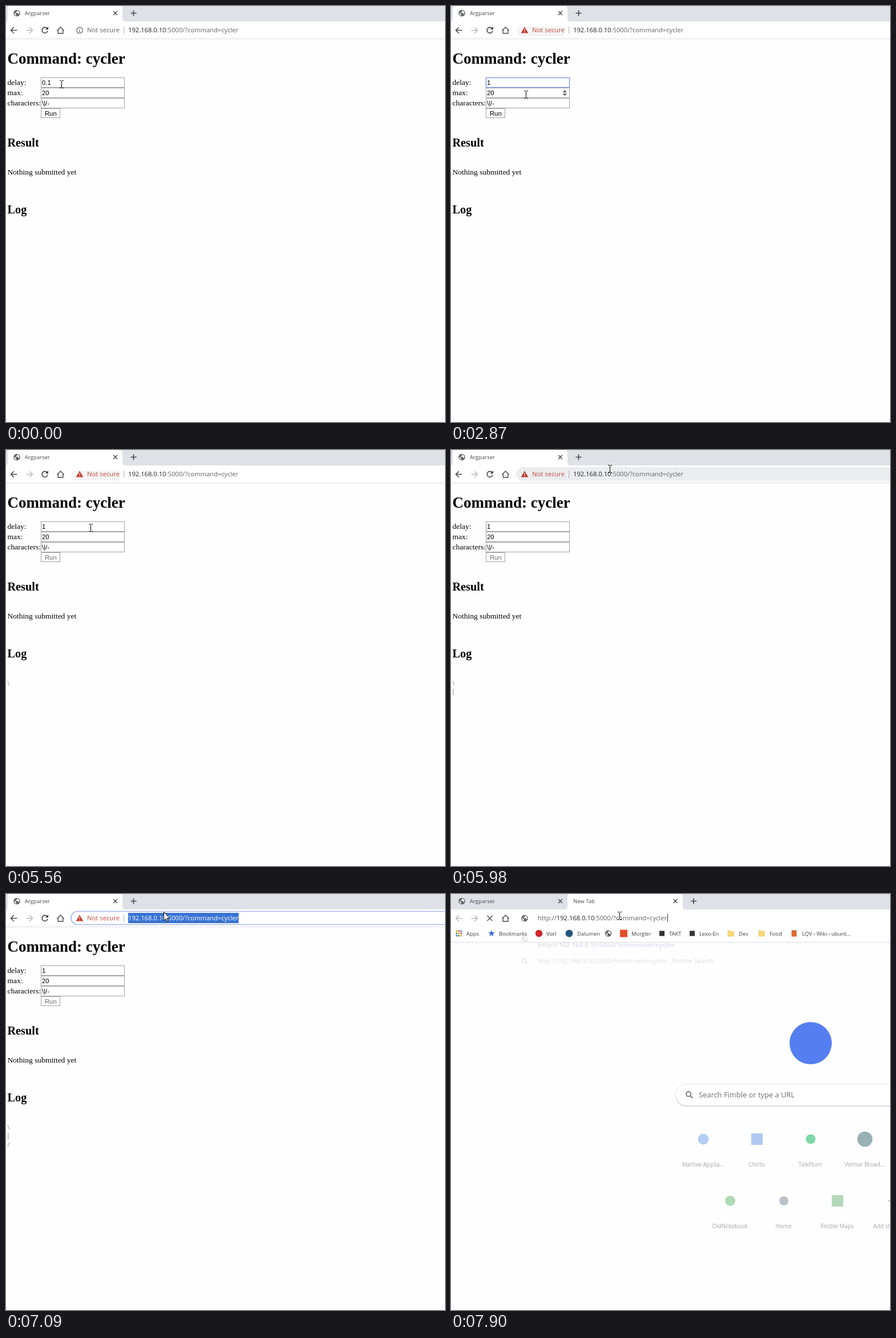
Recreate the animation shown at these times as an HTML page. Size 769 by 728 pixels, loop 8000 ms.

```html
<!DOCTYPE html>
<html lang="en">
<head>
<meta charset="utf-8">
<title>Argparser</title>
<style>
html, body { margin: 0; width: 100%; height: 100%; overflow: hidden; background: #fefefe; }
svg { display: block; width: 769px; height: 728px; }
text { white-space: pre; }
.ui { font-family: "Open Sans", "Noto Sans", sans-serif; }
.page { font-family: "Liberation Serif", "Times New Roman", serif; }
.field { font-family: "Liberation Sans", Arial, sans-serif; }
</style>
</head>
<body>
<svg id="stage" viewBox="0 0 769 728"></svg>
<script>
const LOOP = 8000, DARK = '#202124', GREY = '#5f6368', RED = '#c0392b';
const stage = document.getElementById('stage');

const text = (kind, x, y, s, size, color = '#000', more = '') =>
  `<text class="${kind}" x="${x}" y="${y}" font-size="${size}" fill="${color}" ${more}>${s}</text>`;
const rect = (x, y, w, h, fill, more = '') =>
  `<rect x="${x}" y="${y}" width="${w}" height="${h}" fill="${fill}" ${more}/>`;
const disc = (x, y, r, fill, more = '') =>
  `<circle cx="${x}" cy="${y}" r="${r}" fill="${fill}" ${more}/>`;
const line = (d, color, width = 1.5) =>
  `<path d="${d}" fill="none" stroke="${color}" stroke-width="${width}"/>`;
const shape = (d, fill, more = '') => `<path d="${d}" fill="${fill}" ${more}/>`;

// Mouse moves: start, end, number of steps, end point x, y
const moves = [
  [580, 1270, 6, 198, 133],
  [1580, 1580, 1, 12, 142],
  [2000, 2340, 3, 131, 155],
  [3000, 3440, 4, 81, 187],
  [4280, 4430, 2, 83, 187],
  [5290, 5980, 6, 278, 33],
  [6780, 6780, 1, 276, 31],
  [7750, 7750, 1, 295, 38]
];
const caretFlips = [150, 700, 1130, 1700, 2000, 2870, 3440, 3970, 4430, 4860];

function mouseAt(t) {
  let x = 97, y = 137;
  for (const [from, to, steps, tx, ty] of moves) {
    if (t < from) break;
    const step = t >= to ? steps : 1 + Math.floor((t - from) / (to - from) * (steps - 1) + 1e-6);
    x += (tx - x) * step / steps;
    y += (ty - y) * step / steps;
  }
  return { x: Math.round(x), y: Math.round(y) };
}

// Icons
const globe = (x, y, color = GREY) => `<g transform="translate(${x} ${y})">` + disc(0, 0, 5.8, color) +
  shape('M-4.5-1 L-1.5 1.5 L-1 4.6 Q-4 4-4.5-1Z M0-4.8 Q4-4 4.6 0 L3 2 L1.5-.5 L-1.8-.6 L-1.5-2 L.8-2.6Z', '#fff') + '</g>';
const cross = (x, y, r = 3.4, color = '#45484c') =>
  line(`M${x - r} ${y - r} l${2 * r} ${2 * r} m0 ${-2 * r} l${-2 * r} ${2 * r}`, color, 1.4);
const plus = (x, y) => line(`M${x - 5} ${y} h10 M${x} ${y - 5} v10`, '#45484c', 1.6);
const arrowIcon = (x, dir, color) =>
  line(`M${x - 5.5 * dir} 42.5 h${11 * dir} M${x - .2 * dir} 37.2 L${x - 5.5 * dir} 42.5 L${x - .2 * dir} 47.8`, color);
const lens = (x, y, r, color, width) =>
  disc(x - r / 3, y - r / 3, r, 'none', `stroke="${color}" stroke-width="${width}"`) +
  line(`M${x + r * .4} ${y + r * .4} l${r} ${r}`, color, width);
const home = line('M89.5 43 L95.5 37 L101.5 43 M91.2 42 V48 H99.8 V42', '#45484c', 1.4);
const reload = line('M72 39.2 A5 5 0 1 0 73 43.5', '#45484c', 1.6) + shape('M74 36 V41.3 H68.7Z', '#45484c');
const info = disc(129, 42.5, 5.2, 'none', `stroke="${GREY}" stroke-width="1.3"`) + line('M129 41.8 v3.6 M129 39.2 v1.4', GREY, 1.3);
const warning = shape('M129 36.5 L135.3 47.5 H122.7Z', RED) + line('M129 40 v3.6 M129 44.8 v1.4', '#fff', 1.2);
const folder = x => shape(`M${x - 5} 64 h4 l1.3 1.5 h5.2 v8.5 h-10.5Z`, '#f6d978', 'stroke="#e5c25c" stroke-width=".6"');

const tab = (a, b) => shape(`M${a - 4} 27 Q${a} 27 ${a} 22 V5 Q${a} 0 ${a + 5} -1 H${b - 5} ` +
  `Q${b} 0 ${b} 5 V22 Q${b} 27 ${b + 4} 27Z`, '#fff');

function address(x, prefix, selected) {
  const [strong, weak] = selected ? ['#fff', '#fff'] : [DARK, GREY];
  return text('ui', x, 46, `<tspan fill="${weak}">${prefix}</tspan>192.168.0.10` +
    `<tspan fill="${weak}">:5000/?command=cycler</tspan>`, 11.2, strong);
}

function tabStrip(newTab) {
  return rect(0, 0, 769, 27, '#dee1e6') + (newTab ? tab(204, 406) : tab(3, 204)) +
    rect(0, 27, 769, 30, '#fff') + globe(19, 12.5) + cross(191.5, 12.5) +
    text('ui', 33, 16.3, 'Argparser', 9.55, '#45484c') + arrowIcon(41, -1, '#b8babd') + home;
}

function formPage(t, mouse) {
  const focused = t >= 150 && t < 4860, edited = t >= 2000, sent = t >= 4860;
  const urlFocus = t >= 6660, urlHover = t >= 5840 && !urlFocus;
  let out = tabStrip(false) + plus(223.5, 12.5);

  if (urlHover) out += rect(114, 30, 700, 24, '#ebedef', 'rx="12"');
  else if (urlFocus) out += rect(114, 30.5, 700, 23, '#fff', 'rx="11.5" stroke="#a6b7ec" stroke-width="1.7"') +
    rect(214, 33, 193.5, 18, '#3873d3');
  else if (edited) out += shape('M199 36 H122 Q114 37 114 44 Q115 53 123 53 H199Z', '#f5f4f4');
  out += arrowIcon(14, 1, '#45484c') + reload + (edited ? warning : info) +
    text('ui', 142, 46, 'Not secure', 11.3, edited ? '#c24a3f' : GREY) +
    rect(206, 36, 1, 13, '#b5b7ba') + address(214, '', urlFocus) + rect(0, 57, 769, 1, '#dcdee1');

  out += text('page', 2.5, 101, 'Command: cycler', 27, '#000', 'font-weight="bold"');
  ['delay:', 'max:', 'characters:'].forEach((label, i) => {
    const y = 125.5 + 18 * i;
    out += text('page', 2.5, 138 + 18 * i, label, 13.5) + rect(61.5, y, 146, 17, '#fff', 'stroke="#a3a3a3"');
  });
  if (focused) out += rect(61.5, 125.5, 146, 17, '#fff', 'stroke="#8196dc" stroke-width="1.4"');
  const selecting = t >= 1700 && t < 2000;
  if (selecting) out += rect(63, 128, 16, 13, '#3873d3');
  [edited ? '1' : '0.1', '20', '\\|/-'].forEach((value, i) => {
    out += text('field', 63, 138 + 18 * i, value, 11.25, selecting && !i ? '#fff' : '#000');
  });
  if (caretFlips.filter(f => f <= t).length % 2) out += rect(edited ? 69 : 79, 128, 1, 13, '#000');

  const inForm = mouse.x > 61 && mouse.x < 208;
  if (inForm && mouse.y > 143 && mouse.y < 161)
    out += rect(195, 146, 8, 12, '#f3f3f3') + shape('M196 151 L199.3 147.2 L202.6 151Z M196 153.2 L199.3 157 L202.6 153.2Z', '#505050');

  const onRun = mouse.x > 61 && mouse.x < 95 && mouse.y > 179 && mouse.y < 196;
  out += rect(61.5, 179.5, 33, 16, '#fdfdfd', `stroke="${onRun && !sent ? '#666' : '#a3a3a3'}"`) +
    text('field', 68, 191.5, 'Run', 11.25, sent ? '#6c6f6c' : '#000');

  out += text('page', 2.5, 246, 'Result', 20.25, '#000', 'font-weight="bold"') +
    text('page', 2.5, 295, 'Nothing submitted yet', 13.5) +
    text('page', 2.5, 363, 'Log', 20.25, '#000', 'font-weight="bold"');
  [5010, 5980, 7090].forEach((at, i) => {
    if (t >= at) out += text('page', 2.5, 412 + 15.2 * i, '\\|/'[i], 13.5, '#666');
  });
  return out;
}

const bookmarks = [
  [27, 'Apps'], [84, 'Bookmarks'], [167, 'Vorl'], [221, 'Dalumen'], [316, 'Morgler'], [382, 'TAKT'],
  [435, 'Lexo-En'], [504, 'Dev'], [558, 'Food'], [615, 'LQV › Wiki › ubunt...']
];

const tiles = [
  [442, 429, 'Marlow Applia...', disc(442, 429, 9.5, '#b4cdf2')],
  [536, 429, 'Chirto', rect(526, 419, 20, 20, '#b0c9f1')],
  [630, 429, 'TalkPlum', disc(630, 429, 8.5, '#80d8a8')],
  [725, 429, 'Velmar Broad...', disc(725, 429, 13.3, '#98b1b3')],
  [489, 537, 'OldNotebook', disc(489, 537, 9, '#b0dab8')],
  [583, 537, 'Home', disc(583, 537, 8, '#bcc3c8')],
  [677, 537, 'Fimble Maps', rect(667, 527, 20, 20, '#b4d9ba')],
  [770, 537, 'Add shortcut', line('M766 537 h8 M770 533 v8', '#a8a8ab')]
];

function newTabPage(t) {
  const settled = t >= 7900;
  let out = tabStrip(true) + cross(393, 12.5) + plus(425, 12.5) +
    text('ui', 214, 16.3, 'New Tab', 9.5, '#45484c') + arrowIcon(14, 1, '#b8babd') +
    cross(68, 42.5, 4.5) + globe(129, 42.5) + address(152, 'http://', false) + rect(379, 35, 1, 14, '#333');

  out += rect(0, 57, 769, 27, '#fff') + rect(0, 84, 769, 1, '#dcdee1');
  if (settled) {
    const url = 'http://192.168.0.10:5000/?command=cycler';
    out += globe(129, 79, '#e6e7e8') + text('ui', 152, 74, 'Argparser', 11, '#e9eaec') +
      text('ui', 152, 92.5, url, 11.3, '#e0e3ee', 'font-weight="bold"') +
      lens(129, 117, 3.2, '#dddddf', 1.2) + text('ui', 152, 121, url + ' - Fimble Search', 11.2, '#dfdfe1');
  }
  for (let i = 0; i < 9; i++)
    out += rect(8.5 + i % 3 * 4, 63.5 + Math.floor(i / 3) * 4, 2.8, 2.8, ['#d9503f', '#e8ae2f', '#3b9b58', '#4a7ce0'][(i * 3 + 1) % 4]);
  const star = Array.from({ length: 10 }, (_, i) => {
    const r = i % 2 ? 2.6 : 6, a = i * Math.PI / 5;
    return `${(71 + r * Math.sin(a)).toFixed(1)} ${(69 - r * Math.cos(a)).toFixed(1)}`;
  });
  out += shape(`M${star.join('L')}Z`, '#3d6de0') + disc(154, 69, 6.2, '#d0262b') + disc(207, 69, 6.5, '#23577c') +
    globe(275.5, 69) + rect(296, 62.5, 13, 13, '#e3502a') + rect(365, 64.5, 9, 9, '#333') +
    rect(418, 64.5, 9, 9, '#333') + folder(490) + folder(544) + rect(596.5, 63.5, 9, 11, '#dd6a36');
  for (const [x, label] of bookmarks) out += text('ui', x, 72.5, label, 9.4, '#3c4043');

  out += disc(630, 261, 37, '#557ff0');
  out += rect(393, 333.5, 480, 38.5, '#d9dadc', 'rx="19.2"') + rect(393.5, 332.5, 480, 37.5, '#fff', 'rx="18.7" stroke="#e6e7e9"') +
    lens(417.5, 351.5, 4.2, '#63676b', 1.6) + text('ui', 434, 356, 'Search Fimble or type a URL', 12.9, '#6b6f73');

  out += `<g opacity="${settled ? 1 : .5}">`;
  for (const [x, y, label, icon] of tiles)
    out += icon + text('ui', x - .5, y + 48, label, 9.9, '#a6a7aa', 'text-anchor="middle"');
  return out + '</g>';
}

function pointer(t, { x, y }) {
  const inUrl = y < 56 && x > 114 && !(t >= 6780 && t < 7750);
  const inField = x > 61 && x < 208 && y > 124 && y < 179;
  return `<g transform="translate(${x} ${y})">` + (inUrl || inField
    ? line('M-3 -6.5 H-.5 M1.5 -6.5 H4 M.5 -6 V6 M-3 6.5 H-.5 M1.5 6.5 H4', '#000', 1)
    : shape('M.5 .5 V15.5 L4 12.3 L6.2 17.3 L8.4 16.3 L6.2 11.4 H10.8Z', '#fff', 'stroke="#000"')) + '</g>';
}

let shown = '';
function frame(now) {
  const t = now % LOOP, mouse = mouseAt(t);
  const picture = rect(0, 0, 769, 728, '#fefefe') +
    (t < 7750 ? formPage(t, mouse) : newTabPage(t)) + pointer(t, mouse);
  if (picture !== shown) stage.innerHTML = shown = picture;
  requestAnimationFrame(frame);
}
frame(0);
</script>
</body>
</html>
```
